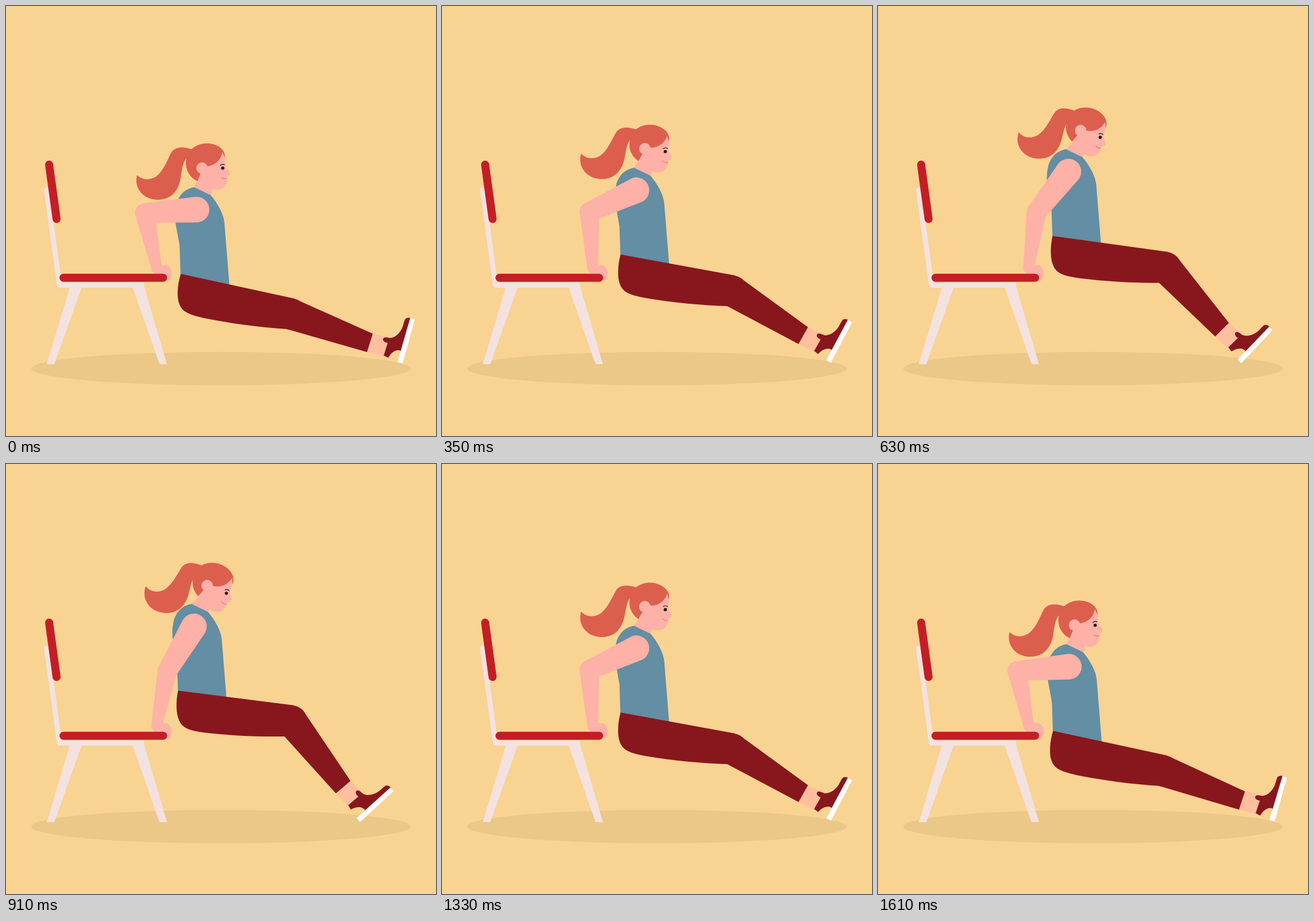
An HTML page with a canvas for the animation above (1.68 s loop, 748 by 748 pixels).

```html
<!DOCTYPE html>
<html lang="en">
<head>
<meta charset="utf-8">
<title>Chair dips</title>
<style>
  html, body { margin: 0; width: 100%; height: 100%; overflow: hidden; background: #f8d392; }
  canvas { display: block; width: 100vw; height: 100vh; }
</style>
</head>
<body>
<canvas id="stage" width="748" height="748"></canvas>
<script>
const ctx = document.getElementById('stage').getContext('2d');
const STEP = 70, STEPS = 24, RAD = Math.PI / 180;
const COLOR = {
  wall: '#f8d392', shadow: '#ebc788', frame: '#f3e2df', seat: '#c41e25',
  skin: '#feb1a7', ankle: '#ffbf9f', hair: '#dc5f4d', shirt: '#638ea3',
  pants: '#88171d', sole: '#ffffff', ink: '#1d1517', lips: '#d9705f'
};

const SHAPE = {
  shirt: 'M327 315C312 318 302 327 297 342C294 355 293 366 295 378L302 417L304 478L389 492L388.5 484L380 378C379 362 368 343 356 329Z',
  thigh: 'M304 466L502 509L496 536L489 562C440 559 390 552 345 543C320 537 306 533 301 517C297 506 298 485 304 466Z',
  shin: 'M507 511.4L638 570L628 602L488.6 562Z',
  ankle: 'M638 570L628 602L660 610L669 578Z',
  shoe: 'M657 608L664 586C658 585 655 582 656 579C658 575 664 577 668 577.5C678 577 686 568 690 558C692 552 693 546 695 544Q699 541 704 543L687 600C680 596 670 602 665 612Z',
  sole: 'M703 543L711 545.5L690 622L681 619.5Z',
  ponytail: 'M326 250C312 245 296 243 288 254C281 266 276 284 262 296C250 304 237 303 228 294C222 317 239 337 264 337C289 337 301 319 304 298C306 284 308 270 315 263L330 262Z',
  face: 'M345 260L376 252L381 263L382 280L389 289Q391 294 384 296L384.5 303C384 314 376 320 366 319.5L350 317L333 304Z',
  hair: 'M333 305C318 297 312 284 313 270C313 252 331 239 349 239C367 239 382 249 381 264L376.5 254C374 266 366 277 350 279L338 292Z',
  brow: 'M372.8 277.3Q376 274.3 380 276',
  mouth: 'M374.5 298.8Q379 301.5 384 300',
  hand: 'M253 452C252 460 256 466 263 467L282 478C286 476 289 468 288 462C287 458 284 452 280 451L270 451Z',
  legs: 'M112 486L133 486L84 623L71 623ZM219 486L238 480L280 623L267 623Z',
  frame: 'M70.5 320L93 485.5L236 485.5'
};
for (const key in SHAPE) SHAPE[key] = new Path2D(SHAPE[key]);

const WRIST = [262, 455], HIP = [304, 466], KNEE = [496, 536];
const NECK = [344.5, 318], TAIL_ROOT = [322, 250];

function fill(path, color) {
  ctx.fillStyle = color;
  ctx.fill(path);
}

function stroke(path, color, width, cap = 'round') {
  Object.assign(ctx, { strokeStyle: color, lineWidth: width, lineCap: cap, lineJoin: 'round' });
  ctx.stroke(path);
}

function disc([x, y], r, color) {
  ctx.fillStyle = color;
  ctx.beginPath();
  ctx.arc(x, y, r, 0, 2 * Math.PI);
  ctx.fill();
}

function bar(x1, y1, x2, y2, width, color) {
  stroke(new Path2D(`M${x1} ${y1}L${x2} ${y2}`), color, width);
}

// Tapered capsule around two circles.
function limb(a, ra, b, rb, color) {
  const dx = b[0] - a[0], dy = b[1] - a[1];
  const dir = Math.atan2(dy, dx), off = Math.acos((ra - rb) / Math.hypot(dx, dy));
  ctx.fillStyle = color;
  ctx.beginPath();
  ctx.arc(a[0], a[1], ra, dir + off, dir - off + 2 * Math.PI);
  ctx.arc(b[0], b[1], rb, dir - off, dir + off);
  ctx.fill();
}

function group(draw, [px, py] = [0, 0], degrees = 0, dx = 0, dy = 0) {
  ctx.save();
  ctx.translate(px + dx, py + dy);
  ctx.rotate(degrees * RAD);
  ctx.translate(-px, -py);
  draw();
  ctx.restore();
}

// Arm joints for a lift between 0 (lowered) and 1 (raised).
function armAt(lift) {
  const fore = (-12.1 + 23.7 * lift) * RAD, upper = (3.8 + 56.4 * lift) * RAD;
  const elbow = [WRIST[0] + 97 * Math.sin(fore), WRIST[1] - 97 * Math.cos(fore)];
  const shoulder = [elbow[0] + 90 * Math.cos(upper), elbow[1] - 90 * Math.sin(upper)];
  return { elbow, shoulder };
}
const REST = armAt(0).shoulder;

function drawLeg(lift) {
  const thighTurn = -5.1 * lift;
  group(() => {
    fill(SHAPE.thigh, COLOR.pants);
    disc(KNEE, 27.3, COLOR.pants);
    group(() => {
      fill(SHAPE.ankle, COLOR.ankle);
      fill(SHAPE.shin, COLOR.pants);
      fill(SHAPE.shoe, COLOR.pants);
      fill(SHAPE.sole, COLOR.sole);
      bar(665, 611.5, 682, 619, 0.7, COLOR.ankle);
    }, KNEE, 32.5 * lift - thighTurn);
  }, HIP, thighTurn);
}

function drawHead(lift) {
  group(() => fill(SHAPE.ponytail, COLOR.hair),
    TAIL_ROOT, 5.5 * lift, 23.7 * lift, -0.5 * lift);
  fill(new Path2D(`M${334 + 7 * lift} 301L327 316L356 330L${359.5} ${318 + 5 * lift}Z`), COLOR.skin);
  group(() => {
    fill(SHAPE.face, COLOR.skin);
    fill(SHAPE.hair, COLOR.hair);
    disc([341, 282], 10, COLOR.skin);
    disc([377, 282], 2.8, COLOR.ink);
    stroke(SHAPE.brow, COLOR.ink, 1.2);
    stroke(SHAPE.mouth, COLOR.lips, 1);
  }, NECK, 22 * lift);
}

function drawChair() {
  fill(SHAPE.legs, COLOR.frame);
  stroke(SHAPE.frame, COLOR.frame, 9);
  bar(75, 276, 88, 370.5, 14, COLOR.seat);
  bar(100, 472.8, 273.3, 472.8, 14, COLOR.seat);
}

function drawScene(lift) {
  const { elbow, shoulder } = armAt(lift);
  ctx.fillStyle = COLOR.wall;
  ctx.fillRect(0, 0, 748, 748);
  ctx.fillStyle = COLOR.shadow;
  ctx.beginPath();
  ctx.ellipse(374, 630.7, 330, 29, 0, 0, 2 * Math.PI);
  ctx.fill();

  group(() => {
    drawHead(lift);
    fill(SHAPE.shirt, COLOR.shirt);
    drawLeg(lift);
  }, [0, 0], 0, shoulder[0] - REST[0], shoulder[1] - REST[1]);

  limb(shoulder, 22.3, elbow, 17, COLOR.skin);
  limb(elbow, 17, WRIST, 9.2, COLOR.skin);
  fill(SHAPE.hand, COLOR.skin);
  drawChair();
}

function tick() {
  const step = Math.floor(performance.now() / STEP) % STEPS;
  drawScene((1 - Math.cos(2 * Math.PI * step / STEPS)) / 2);
  requestAnimationFrame(tick);
}
tick();
</script>
</body>
</html>
```
